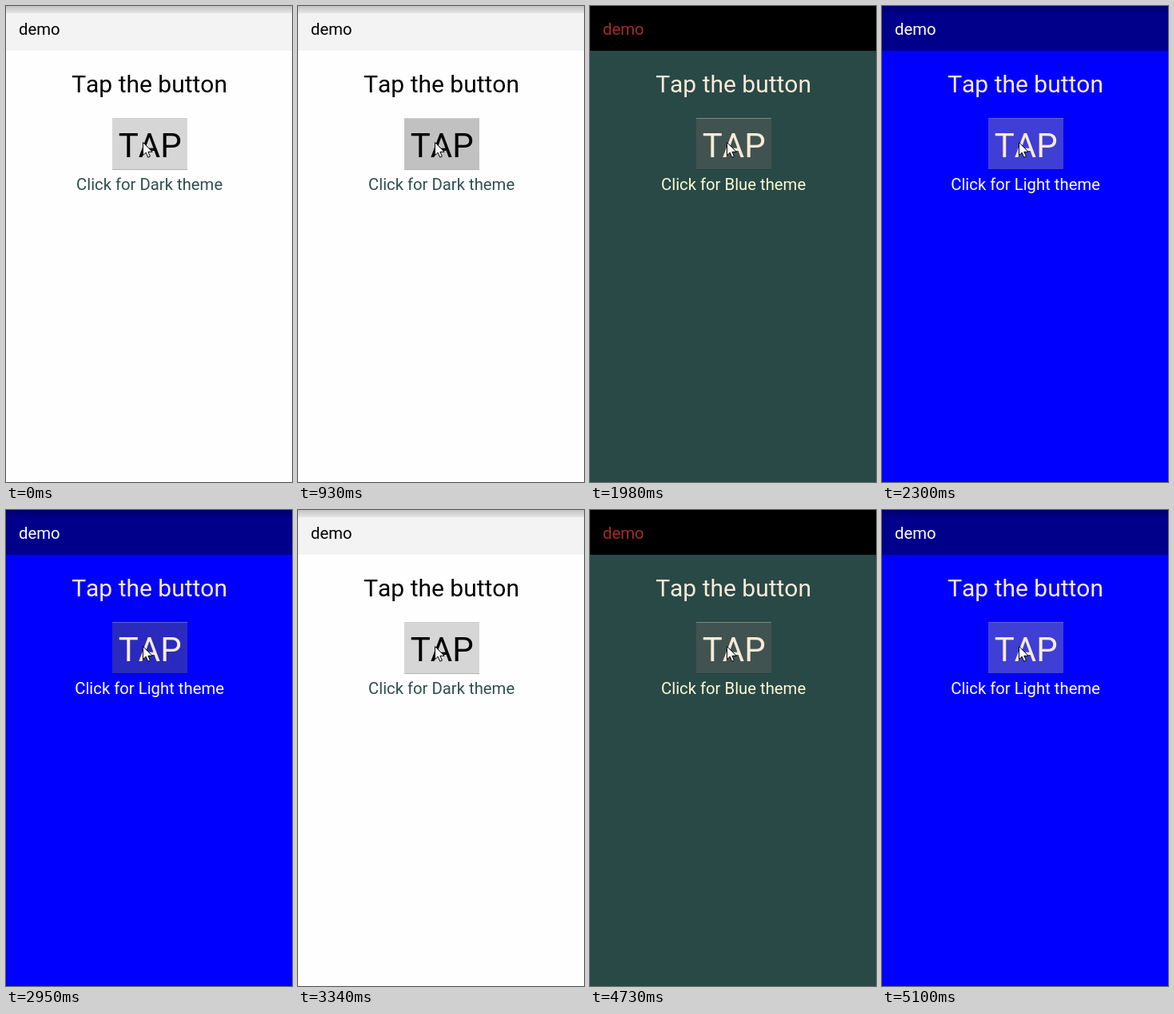
Write an HTML page that moves like this. It is 358 by 595 pixels and loops after 6.03 s.

```html
<!DOCTYPE html>
<html lang="en">
<head>
<meta charset="utf-8">
<title>Theme demo</title>
<style>
  html, body { margin: 0; width: 100%; height: 100%; overflow: hidden; }
  svg { display: block; width: 358px; height: 595px; }
  text { font-family: Roboto, "Noto Sans", sans-serif; font-kerning: none; }
  .mid { text-anchor: middle; }
  #page { fill: var(--page); }
  #bar { fill: var(--bar); }
  #name { fill: var(--name); font-size: 20.3px; }
  #title { fill: var(--text); font-size: 30px; }
  #label { fill: var(--text); font-size: 42px; }
  #hint { fill: var(--hint); font-size: 20.3px; }
  #face { fill: var(--face); }
  #edge { fill: var(--edge); }
  #base { fill: var(--base); }
</style>
</head>
<body>
<svg id="stage" viewBox="0 0 358 595">
  <defs>
    <linearGradient id="shade" x1="0" y1="0" x2="0" y2="1">
      <stop offset="0" stop-color="#000" stop-opacity=".2"/>
      <stop offset="1" stop-color="#000" stop-opacity=".06"/>
    </linearGradient>
  </defs>
  <rect id="page" width="358" height="595"/>
  <rect id="bar" width="358" height="56"/>
  <rect width="358" height="9" fill="url(#shade)"/>
  <text id="name" x="16" y="36">demo</text>
  <text id="title" class="mid" x="179.6" y="108">Tap the button</text>
  <rect id="face" x="133" y="140" width="94" height="65" rx="1"/>
  <rect id="edge" x="133" y="140" width="94" height="1"/>
  <rect id="base" x="133" y="204" width="94" height="1"/>
  <text id="label" class="mid" x="180.2" y="189">TAP</text>
  <text id="hint" class="mid" x="179.6" y="230"></text>
  <path d="M171.5 170.5v16.2l3.7-3.5 2.5 6 2.7-1.2-2.5-5.7h5.2z"
        fill="#fff" stroke="#000" stroke-width="1"/>
</svg>
<script>
const themes = {
  Light: { page: '#fefefe', bar: '#f3f3f3', name: '#000', text: '#000', hint: '#2f4f4f',
           idle: '#d6d6d6', down: '#c1c1c1', edge: '#cecece', base: '#b4b4b4', next: 'Dark' },
  Dark: { page: '#294947', bar: '#000', name: '#a52a2a', text: '#faebd7', hint: '#fafad2',
          idle: '#546966', down: '#405351', edge: '#778a87', base: '#203c3a', next: 'Blue' },
  Blue: { page: '#0000ff', bar: '#00008b', name: '#fff', text: '#faebd7', hint: '#fffff0',
          idle: '#3f3fd6', down: '#2a2abf', edge: '#6464cc', base: '#0000c8', next: 'Light' }
};

// start in ms, theme, button pressed
const steps = [
  [0, 'Light', false], [930, 'Light', true],
  [1240, 'Dark', false], [1980, 'Dark', true],
  [2300, 'Blue', false], [2950, 'Blue', true],
  [3340, 'Light', false], [3850, 'Light', true],
  [4210, 'Dark', false], [4730, 'Dark', true],
  [5100, 'Blue', false]
];
const loop = 6030;
const stage = document.getElementById('stage');
const hint = document.getElementById('hint');
let shown = null;

function show(step) {
  if (step === shown) return;
  shown = step;
  const [, name, pressed] = step;
  const theme = themes[name];
  for (const key of ['page', 'bar', 'name', 'text', 'hint', 'edge', 'base']) {
    stage.style.setProperty('--' + key, theme[key]);
  }
  stage.style.setProperty('--face', pressed ? theme.down : theme.idle);
  hint.textContent = `Click for ${theme.next} theme`;
}

const start = performance.now();
function tick() {
  const time = (performance.now() - start) % loop;
  show(steps.findLast(step => step[0] <= time));
  requestAnimationFrame(tick);
}
tick();
</script>
</body>
</html>
```
